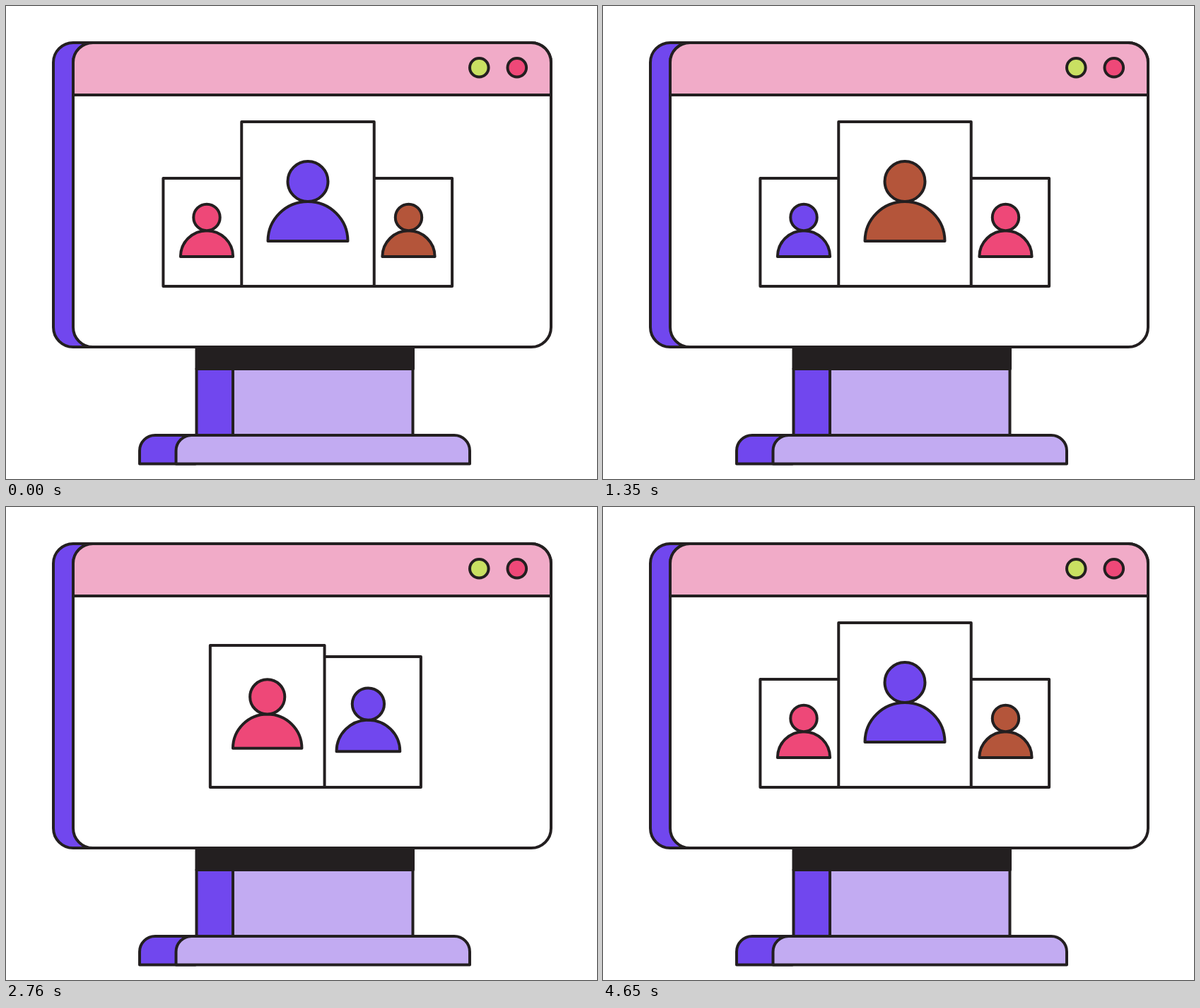
Write an HTML page that moves like this. It is 836x670 px and loops after 4800 ms.

```html
<!DOCTYPE html>
<html lang="en">
<head>
<meta charset="utf-8">
<title>Candidate carousel</title>
<style>
  html, body { margin: 0; width: 100%; height: 100%; overflow: hidden; background: #fff; }
  svg { display: block; width: 100%; height: 100%; }
  .ink { stroke: #231f20; stroke-width: 4; stroke-linejoin: round; stroke-linecap: round; }
</style>
</head>
<body>
<svg viewBox="0 0 836 670">
  <g class="ink">
    <path fill="#7147ee" d="M125 52H95a28 28 0 0 0-28 28V455a28 28 0 0 0 28 28H125z"/>
    <rect fill="#fff" x="95" y="52" width="676" height="431" rx="28"/>
    <path fill="#f1abc8" d="M95 126V80a28 28 0 0 1 28-28H743a28 28 0 0 1 28 28V126z"/>
    <circle fill="#c9e062" cx="669.3" cy="87.2" r="13.3"/>
    <circle fill="#ee4878" cx="722.8" cy="87.2" r="13.3"/>
    <path fill="#7147ee" d="M269.5 514H321V608H269.5z"/>
    <path fill="#c2abf2" d="M321 514H575.5V608H321z"/>
    <path fill="#231f20" d="M269.5 484H576V514H269.5z"/>
    <path fill="#7147ee" d="M268 608H211a22 22 0 0 0-22 22V648.5H268z"/>
    <path fill="#c2abf2" d="M240.5 648.5V630a22 22 0 0 1 22-22H634a22 22 0 0 1 22 22V648.5z"/>
  </g>
  <g id="cards" class="ink"></g>
  <g id="badge">
    <circle class="ink" fill="#c9e062" r="48"/>
    <path fill="none" stroke="#fff" stroke-width="9" stroke-linejoin="bevel" d="M-26-7L-3.5 14.5L29.5-16.5"/>
  </g>
</svg>
<script>
const LOOP = 4800, STEP = 30, SHIFT = 570;
const STARTS = [460, 1505, 2513];
const LEFT = 284, MID = 427, RIGHT = 569.5, FLOOR = 397, SMALL = 0.657;

const cardLayer = document.getElementById('cards');
const badge = document.getElementById('badge');

const clamp = x => Math.min(1, Math.max(0, x));
const mix = (a, b, p) => a + (b - a) * p;
const ease = x => { x = clamp(x); return x * x * (3 - 2 * x); };
const ramp = (t, from, to) => ease((t - from) / (to - from));

function popOut(x) {
  const u = clamp(x) - 1;
  return 1 + 2.4 * u * u * u + 1.4 * u * u;
}

function add(parent, tag, attrs) {
  const el = document.createElementNS('http://www.w3.org/2000/svg', tag);
  set(el, attrs);
  parent.append(el);
  return el;
}

function set(el, attrs) {
  for (const name in attrs) el.setAttribute(name, attrs[name]);
}

function makeCard(color) {
  const group = add(cardLayer, 'g', {});
  return {
    group,
    frame: add(group, 'rect', { fill: '#fff' }),
    body: add(group, 'path', { fill: color }),
    head: add(group, 'circle', { fill: color })
  };
}

const violet = makeCard('#7147ee');
const brown = makeCard('#b4553a');
const pink = makeCard('#ee4878');
const ring = [violet, brown, pink]; // middle, right, left

// stretch raises the shoulders and shrinks the head; tilt moves the head aside
function placeCard(card, x, k, stretch = 0, tilt = 0) {
  const w = 187.5 * k, h = 233 * k, r = 56.5 * k;
  const base = FLOOR - 64 * k;
  const rise = mix(56, 77, stretch) * k;
  const headR = mix(28.5, 23.3, stretch) * k;
  set(card.frame, { x: x - w / 2, y: FLOOR - h, width: w, height: h });
  set(card.body, { d: `M${x - r} ${base}A${r} ${rise} 0 0 1 ${x + r} ${base}Z` });
  set(card.head, { cx: x + 8.5 * tilt, cy: base - rise - headR + 2 * tilt, r: headR });
  cardLayer.append(card.group);
}

function draw(t) {
  let turn = 0;
  while (turn < 2 && t >= STARTS[turn + 1]) turn++;
  const age = t - STARTS[turn];
  const p = ease(age / SHIFT);
  const enter = ease((age - (turn ? 0 : 25)) / SHIFT);
  const [leaving, entering, passing] = [0, 1, 2].map(i => ring[(i + turn) % 3]);

  const stretch = ramp(t, 3150, 3570) * (1 - ramp(t, 4200, 4660));
  const tilt = ramp(t, 1900, 2180) * (1 - ramp(t, 2460, 2740));
  const lean = card => card === violet ? tilt : 0;

  const outgoing = () => placeCard(leaving, mix(MID, LEFT, p), mix(1, SMALL, p));
  const incoming = () => placeCard(entering, mix(RIGHT, MID, enter), mix(SMALL, 1, p),
    entering === violet ? stretch : 0, lean(entering));

  placeCard(passing, mix(LEFT, RIGHT, p), SMALL, 0, lean(passing));
  if (p < 0.5) { incoming(); outgoing(); }
  else { outgoing(); incoming(); }

  const size = popOut((t - 3120) / 390) * (1 - ramp(t, 4320, 4640));
  const shown = t > 3120 && size > 0.01;
  set(badge, {
    transform: `translate(496 178) scale(${shown ? size : 0})`,
    visibility: shown ? 'visible' : 'hidden'
  });
}

// The final pose equals the opening one, so the first rest needs no special case
function tick() {
  const t = performance.now() % LOOP;
  draw(Math.floor(t / STEP) * STEP);
  requestAnimationFrame(tick);
}
tick();
</script>
</body>
</html>
```
